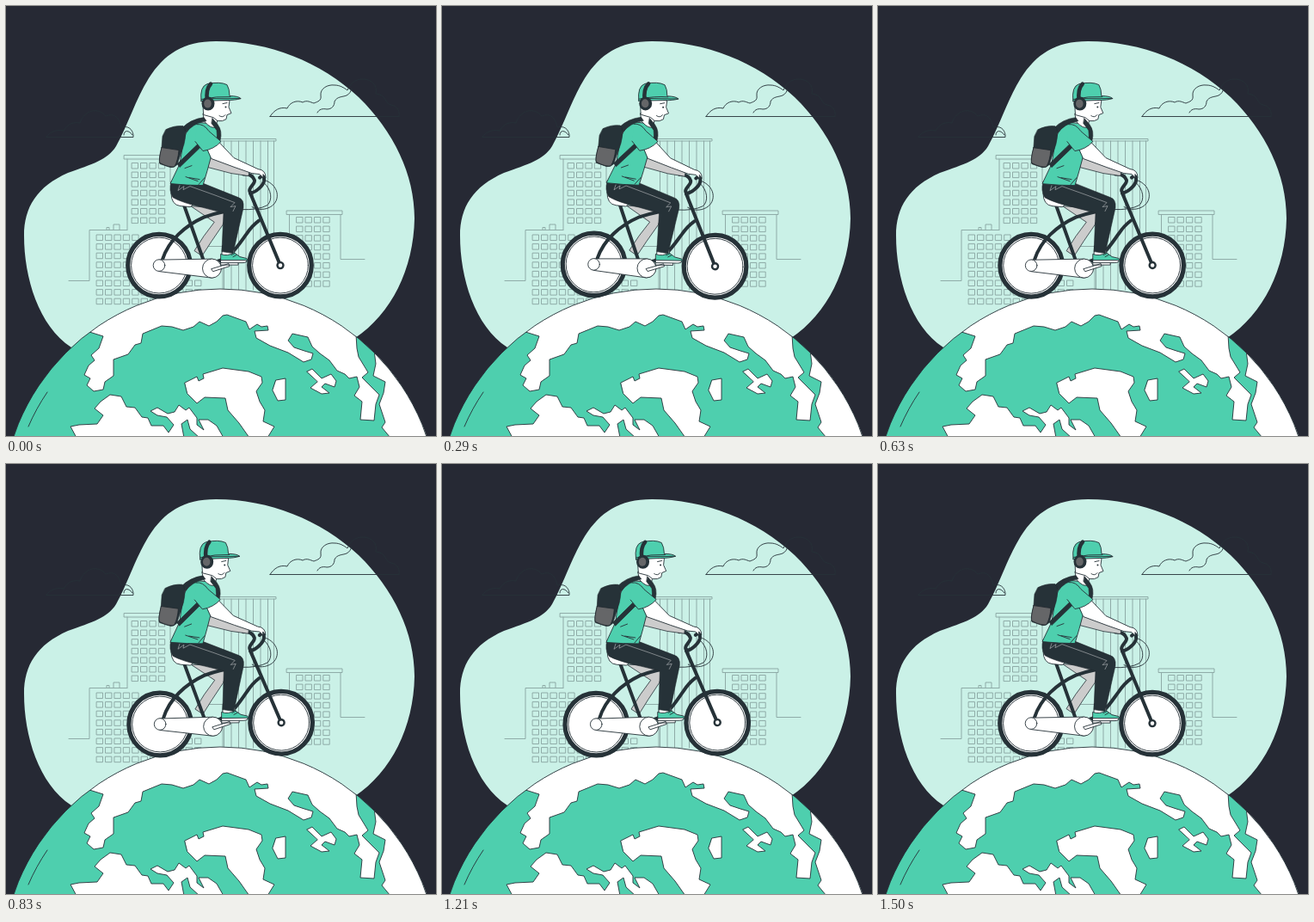
An HTML page for the animation above (1540 ms loop, 500x500 px).

```html
<!DOCTYPE html>
<html lang="en">
<head>
<meta charset="utf-8">
<title>Cycling around the globe</title>
<style>
  html, body { margin: 0; height: 100%; overflow: hidden; background: #262934; }
  svg { display: block; width: 100vw; height: 100vh; }
  path, circle { stroke-linejoin: round; stroke-linecap: round; }
  .line { fill: none; stroke: #263238; stroke-width: .9; }
  .city { opacity: .4; }
  .white { fill: #fff; stroke: #263238; stroke-width: .9; }
  .green { fill: #4ecfae; stroke: #263238; stroke-width: .9; }
  .gray { fill: #ccc; stroke: #263238; stroke-width: .8; }
  .dark { fill: #263238; stroke: #20282e; stroke-width: .6; }
  .tube { fill: none; stroke: #263238; stroke-width: 4; }
  .tyre { fill: #fff; stroke: #263238; stroke-width: 5.2; }
</style>
</head>
<body>
<svg viewBox="0 0 500 500">
  <clipPath id="disc"><circle cx="249" cy="583" r="254"/></clipPath>
  <path fill="#caf1e7" d="M244 41C306 41 366 65 410 106C451 146 475 196 475 247C474 306 448 358 406 386L300 440L76 397C38 372 21 316 21 267C21 234 36 210 72 194C100 184 118 179 128 163C142 138 150 110 166 84C184 56 206 41 244 41Z"/>

  <g class="line city">
    <path id="windows"/>
    <path d="M73 319.5H97V260.5H141M117 260V257.5H120V260M125 260V254H132V260
      M141 260V178M137.5 173.5H196V178H137.5ZM191 178V205
      M248 154.5H314V157H248ZM253.5 157V330M262 157V330M270.5 157V330M279 157V330M287.5 157V330M296 157V330M304.5 157V330M311.5 157V330
      M326.5 238H391V242.5H326.5ZM329.5 243V330M389 243V294.5H417M228 279.5H252V330"/>
  </g>
  <g class="line">
    <path d="M307 128.5H457M307 128.5C312 121 318 117 327 119C330 112 338 109 345 112C350 109 354 112 358 113C363 111 367 110 366 104C365 96 374 91 382 92C388 92 393 95 397 98C400 91 405 85 415 85C426 85 432 93 430 102C443 103 440 114 448 115C456 117 458 123 457 128M362 124C364 120 368 119 373 120C379 120 382 116 382 111C385 105 391 106 396 104C400 102 401 99 402 96"/>
    <path d="M47 152.5H148V150C147 143 142 139 134 141C132 130 126 124 116 128C107 117 91 121 86 136C75 134 70 140 67 145C58 143 51 147 47 152M137 150C137 144 143 144 147 150"/>
  </g>

  <g clip-path="url(#disc)">
    <circle cx="249" cy="583" r="254" fill="#4ecfae"/>
    <path class="white" d="M97 379L113 384L108 398L99 406L103 412L96 418L91 429L98 433L94 441L102 448L113 446L115 437L125 430L125 411L142 405L150 394L157 392L159 381L181 372L193 373L206 377L218 373L225 367L236 372L245 367L252 360L257 359L279 367L283 376L292 370L297 373L304 372L305 377L289 378L291 386L307 395L328 403L346 414L355 411L357 404L347 401L335 397L328 389L333 381L351 385L356 396L365 404L376 412L385 424L394 428L399 433L408 431L411 443L405 453L414 460L412 481L428 482L430 463L434 452L424 442L414 432L421 426L410 408L408 398L407 382L400 320H90Z"/>
    <path class="white" d="M428 400L430 416L427 430L441 437L439 450L434 463L441 484L437 490L447 502H510V400Z"/>
    <path class="white" d="M82 502L75 489L85 487L106 486L113 476L103 468L110 460L121 452L134 454L140 466L150 467L158 478L165 479L169 488L183 488L189 496L195 487L187 478L176 476L168 471L176 467L188 474L196 472L201 464L209 470L213 467L222 479L222 487L230 493L224 481L235 481L245 488L253 502H225L214 492L211 481L204 486L207 502Z"/>
    <path class="white" d="M208 438L222 431L224 436L230 433L229 428L252 421L282 425L297 431L298 438L291 448L295 460L301 470L299 483L312 489L304 502H283L271 485L258 470L255 456L231 455L222 462L211 451Z"/>
    <path class="white" d="M314 435L325 433L325 458L316 459L310 447ZM350 425L356 422L367 433L378 428L384 436L382 443L371 439L367 443L376 450L367 451L354 444L362 437Z"/>
    <path class="line" d="M26 489Q35 468 48 449"/>
  </g>
  <circle class="line" cx="249" cy="583" r="254"/>

  <g id="rider">
    <circle class="tyre" cx="178" cy="301" r="36.3"/>
    <circle class="line" cx="178" cy="301" r="32.4"/>
    <circle class="tyre" cx="319" cy="301" r="36.3"/>
    <circle class="line" cx="319" cy="301" r="32.4"/>

    <path class="gray" d="M215 232L245 234L257 240L252 254L239 273L228 290L219 284L230 267L242 251Z"/>
    <path class="tube" d="M182 294C189 272 208 255 230 245Q250 238 273 236M207 231L230 296M243 297C261 294 271 276 280 264Q286 255 294 249M284 217L319 301"/>
    <path class="tube" d="M284 217C291 216 299 208 300 203C301 196 297 197 295 199M285 217C279 212 290 207 289 202Q286 194 276 195"/>
    <path class="line" d="M301 202C313 206 318 217 314 226C310 235 296 239 286 233M300 205C309 213 310 225 304 231Q293 237 273 236"/>
    <circle cx="319" cy="301" r="4.7" fill="#263238"/>
    <circle cx="319" cy="301" r="2.3" fill="#fff"/>

    <path class="white" d="M178 294.5L239 293.5A11 11 0 0 1 239 315.5L178 308Z"/>
    <circle class="white" cx="178" cy="301" r="6.8"/>
    <circle class="white" cx="239.5" cy="304.5" r="11"/>
    <path class="white" d="M239 305L259 299L260 302L241 308ZM250 297H270V300.5H250Z"/>
    <path class="white" d="M192 217Q192 231 203 232L214 233Q219 231 218 225Z"/>

    <path class="gray" d="M238 174L272 188L283 191L282 197L262 194L235 187Z"/>
    <path class="white" d="M252 278L265 280L266 290L251 291Z"/>
    <path class="green" d="M250 288Q258 291 265 286L272 291L280 293Q282 297 279 297H250Z"/>
    <path class="white" d="M250 295H280Q280 298 275 298H250ZM262 289L266 287M264 291L268 289"/>
    <path class="dark" d="M192 204L230 206L270 222Q277 224 276 234L264 287L251 285L253 240L230 234Q204 228 194 222Q189 214 192 204Z"/>
    <path fill="none" stroke="#a5aaad" stroke-width=".7" d="M202 208L200 214L207 209L206 213L214 209L242 219L266 228L261 233L267 232L264 238"/>

    <path class="green" d="M223 135Q211 140 207 153L202 183L191 206Q211 208 229 208L234 191L240 169L247 148L243 137Z"/>
    <path class="line" d="M209 198L223 203M213 199L225 201M208 188L216 185M224 207L231 199"/>
    <path class="white" d="M229 125L231 134Q239 143 244 140L246 131L242 120Z"/>
    <path class="dark" d="M240 130L246 137Q252 145 249 156L246 158L245 144L239 136Z"/>
    <path class="white" d="M233 163L247 157L265 176L293 189Q302 190 302 199L299 195V199L295 195L286 194L266 187L239 177Z"/>
    <path class="dark" d="M230 160L202 187L199 183L224 159Z"/>
    <path class="green" stroke-width=".7" d="M222 137Q230 136 236 145L250 157Q242 166 229 168L220 157"/>

    <path class="dark" d="M205 141Q215 131 230 129L233 133Q217 136 209 147Z"/>
    <path class="dark" d="M186 143Q196 138 206 139Q211 143 207 160L199 184Q195 188 191 187L179 183Q177 180 181 164L182 151Z"/>
    <path d="M181 164L201 167Q200 179 196 186Q191 188 179 182Q177 179 181 164Z" fill="#656668" stroke="#20282e" stroke-width=".8"/>

    <path class="white" d="M229 107L260 109L259 117L262 124L257 126L256 131Q252 134 246 133L241 129L230 126Z"/>
    <path class="line" d="M248 127Q252 130 255 126M252 113L257 112"/>
    <circle cx="255.5" cy="117" r="1" fill="#263238"/>
    <path class="green" d="M227 110Q225 93 234 90Q249 87 257 91Q260 96 260 104Q270 104 273 107Q267 109 255 109L227 110Z"/>
    <path class="line" d="M227 108Q245 104 261 105M240 107L273 107"/>
    <path d="M238 90Q232 96 234 110" fill="none" stroke="#263238" stroke-width="4.5"/>
    <ellipse cx="235" cy="113" rx="7.5" ry="8" fill="#263238"/>
    <ellipse cx="234.500" cy="113" rx="4.3" ry="5" fill="#656668"/>
  </g>
</svg>
<script>
  const LOOP = 1540;
  const rider = document.getElementById('rider');

  function grid(x, y, cols, rows) {
    let d = '';
    for (let r = 0; r < rows; r++)
      for (let c = 0; c < cols; c++)
        d += `M${x + c * 10.4} ${y + r * 10.6}h7v6.5h-7z`;
    return d;
  }
  document.getElementById('windows').setAttribute('d',
    grid(105.5, 266, 5, 8) + grid(157.5, 319, 7, 3) + grid(146.5, 182.5, 4, 7) + grid(338, 245.5, 4, 8));

  // Cubic Bezier (.25, .1, .25, 1), solved by bisection.
  function ease(x) {
    let lo = 0, hi = 1, u;
    for (let i = 0; i < 20; i++) {
      u = (lo + hi) / 2;
      if (.75 * u * (1 - u) + u ** 3 < x) lo = u; else hi = u;
    }
    return .3 * u * (1 - u) ** 2 + 3 * u * u * (1 - u) + u ** 3;
  }

  // Lean forward one degree, back one degree, then upright.
  function lean(p) {
    if (p < .25) return ease(p * 4);
    if (p < .75) return 1 - 2 * ease((p - .25) * 2);
    return ease((p - .75) * 4) - 1;
  }

  function draw() {
    const p = performance.now() % LOOP / LOOP;
    rider.setAttribute('transform', `rotate(${lean(p)} 249 215) translate(0 .6)`);
    requestAnimationFrame(draw);
  }
  draw();
</script>
</body>
</html>
```
